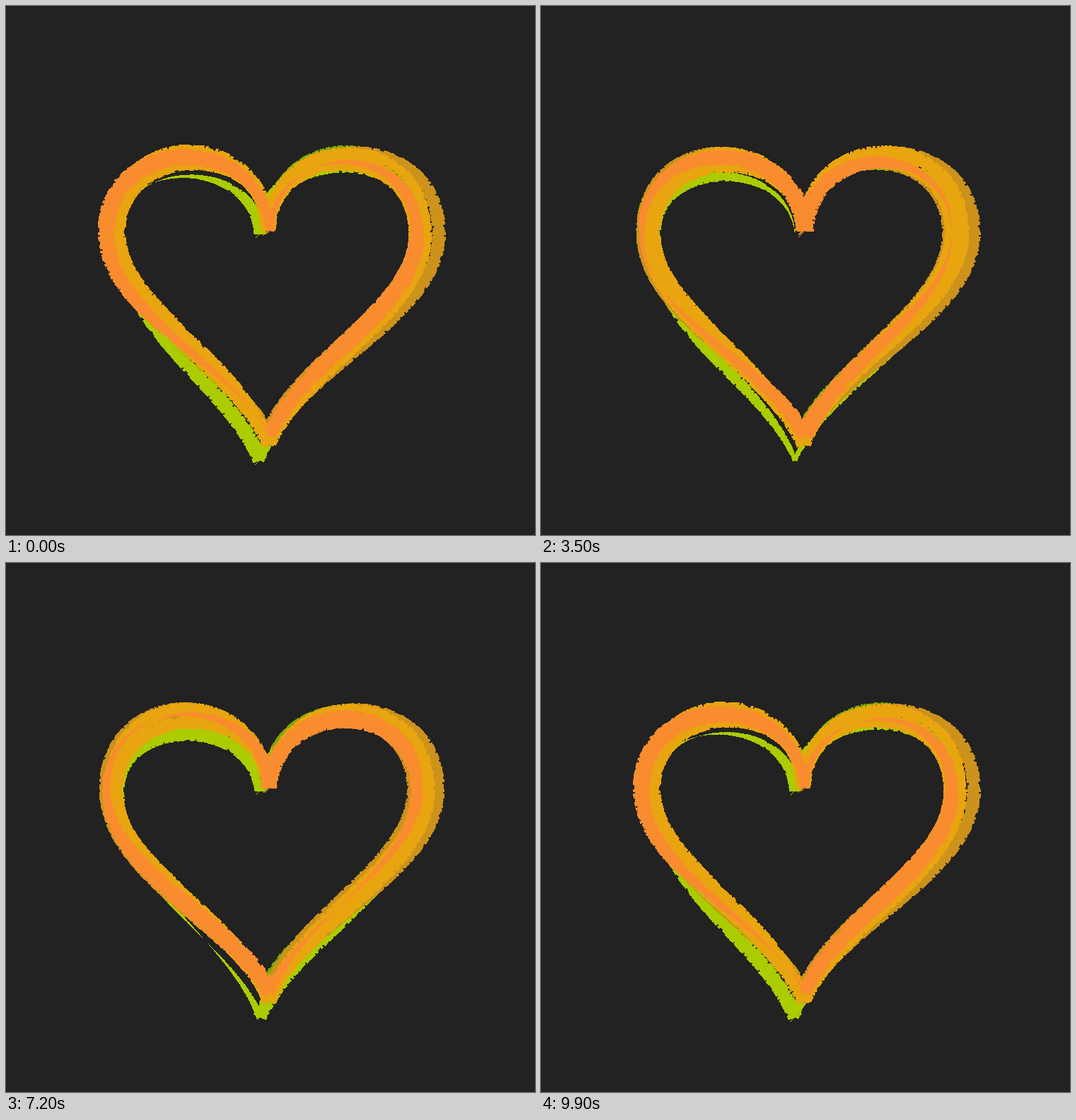
An HTML page that plays this animation: 748 px wide and 748 px high, repeating every 10000 ms.

```html
<!DOCTYPE html>
<html lang="en">
<head>
<meta charset="utf-8">
<title>Brushed heart</title>
<style>
  html, body { margin: 0; width: 100%; height: 100%; overflow: hidden; background: #222; }
  svg { display: block; width: 100vw; height: 100vh; }
  path { fill: none; shape-rendering: crispEdges; }
</style>
</head>
<body>
<svg id="stage" viewBox="0 0 748 748"></svg>
<script>
const LOOP = 10000, STEP = 100, SIDE_Y = 321;
const GREEN = '#79a900', LIME = '#aacc00', BROWN = '#cc921c', GOLD = '#e8a50f', ORANGE = '#f98c2e';

// sides, tops and mids give [left, right]; a width wave runs around each heart,
// with `turns` passes per loop, `waves` per half and a `steady` share that never thins.
const hearts = [
  { color: GREEN, cusp: [367, 316], tip: 598, sides: [148, 588], tops: [213, 205], mids: [466, 462],
    peak: 17, phase: -0.32 },
  { color: LIME, cusp: [359, 322], tip: 642, sides: [159, 586], tops: [241, 225], mids: [492, 489],
    peak: 22, phase: -0.2 },
  { color: BROWN, cusp: [370, 317], tip: 621, sides: [139, 612], tops: [206, 208], mids: [479, 473],
    peak: 20, phase: -0.19, turns: 3, waves: 0.42 },
  { color: BROWN, cusp: [370, 317], tip: 601, sides: [152, 575], tops: [216, 223], mids: [470, 460],
    peak: 17, phase: 0, steady: 0.6 },
  { color: GOLD, cusp: [371, 317], tip: 619, sides: [149, 596], tops: [206, 208], mids: [472, 472],
    peak: 22, phase: 0.08, steady: 0.5 },
  { color: GOLD, cusp: [372, 317], tip: 619, sides: [159, 580], tops: [225, 223], mids: [463, 465],
    peak: 22, phase: 0.6, steady: 0.5 },
  { color: ORANGE, cusp: [373, 318], tip: 607, sides: [142, 581], tops: [214, 221], mids: [470, 464],
    peak: 26, phase: 0.35 }
];

const stage = document.getElementById('stage');
const mix = (a, b, k) => a + (b - a) * k;
const hash = n => { const v = Math.sin(n * 12.9898) * 43758.5453; return v - Math.floor(v); };

function addPath(color, width) {
  const path = document.createElementNS('http://www.w3.org/2000/svg', 'path');
  path.setAttribute('stroke', color);
  path.setAttribute('stroke-width', width);
  stage.append(path);
  return path;
}

// Evenly timed points on a cubic, each with its unit normal.
function ribs(a, b, c, d, count) {
  return Array.from({ length: count }, (_, i) => {
    const t = (i + 0.5) / count, s = 1 - t;
    const at = n => s * s * s * a[n] + 3 * s * s * t * b[n] + 3 * s * t * t * c[n] + t * t * t * d[n];
    const slope = n => s * s * (b[n] - a[n]) + 2 * s * t * (c[n] - b[n]) + t * t * (d[n] - c[n]);
    const length = Math.hypot(slope(0), slope(1));
    return { x: at(0), y: at(1), nx: -slope(1) / length, ny: slope(0) / length, t };
  });
}

// Handle height that makes a cubic from y0 to y1 pass midY halfway.
const handleHeight = (y0, y1, midY) => (8 * midY - y0 - y1) / 6;

// One half: over the lobe from the cusp, then down the flank; `v` is -1..0 on the left, 0..1 on the right.
function halfRibs({ cusp, tip, sides, tops, mids }, n) {
  const [x, y] = cusp, side = sides[n], sign = n ? 1 : -1;
  const lobeY = handleHeight(y, SIDE_Y, tops[n]);
  const flankY = handleHeight(SIDE_Y, tip, mids[n]);
  const lobe = ribs(cusp, [mix(x, side, 0.04), lobeY], [side, lobeY], [side, SIDE_Y], 120);
  const flank = ribs([side, SIDE_Y], [side, flankY - 35], [mix(x, side, 0.22), flankY + 35], [x, tip], 130);
  return [
    ...lobe.map(rib => ({ ...rib, v: sign * rib.t / 2 })),
    ...flank.map(rib => ({ ...rib, v: sign * (1 + rib.t) / 2 }))
  ];
}

hearts.forEach((heart, index) => {
  heart.ribs = [...halfRibs(heart, 0), ...halfRibs(heart, 1)];
  heart.ribs.forEach((rib, i) => rib.trim = 1 - 0.35 * hash(index * 600 + i) ** 3);
  heart.brush = addPath(heart.color, 4);
  heart.ticks = addPath(heart.color, 1);
});

function widthAt({ peak, phase, turns = 2, waves = 0.9, steady = 0 }, v, time) {
  const wave = Math.abs(Math.cos(Math.PI * (turns * time / LOOP + waves * v + phase)));
  return peak * mix(wave, 1, steady);
}

const stroke = (x, y, dx, dy) =>
  `M${(x - dx).toFixed(1)} ${(y - dy).toFixed(1)}l${(2 * dx).toFixed(1)} ${(2 * dy).toFixed(1)}`;

function draw(time) {
  for (const heart of hearts) {
    const [x, y] = heart.cusp;
    const brush = heart.ribs.map(rib => {
      const reach = widthAt(heart, rib.v, time) / 2 * rib.trim;
      return stroke(rib.x, rib.y, rib.nx * reach, rib.ny * reach);
    });
    const tick = (tickY, v) => {
      const reach = widthAt(heart, v, time) * 0.35;
      return stroke(x, tickY, reach, -reach);
    };
    heart.brush.setAttribute('d', brush.join(''));
    heart.ticks.setAttribute('d', tick(y, 0) + tick(heart.tip, -1));
  }
}

let start, shown = -1;
function frame(now) {
  start ??= now;
  const time = Math.floor((now - start) % LOOP / STEP) * STEP;
  if (time !== shown) draw(shown = time);
  requestAnimationFrame(frame);
}
draw(0);
requestAnimationFrame(frame);
</script>
</body>
</html>
```
